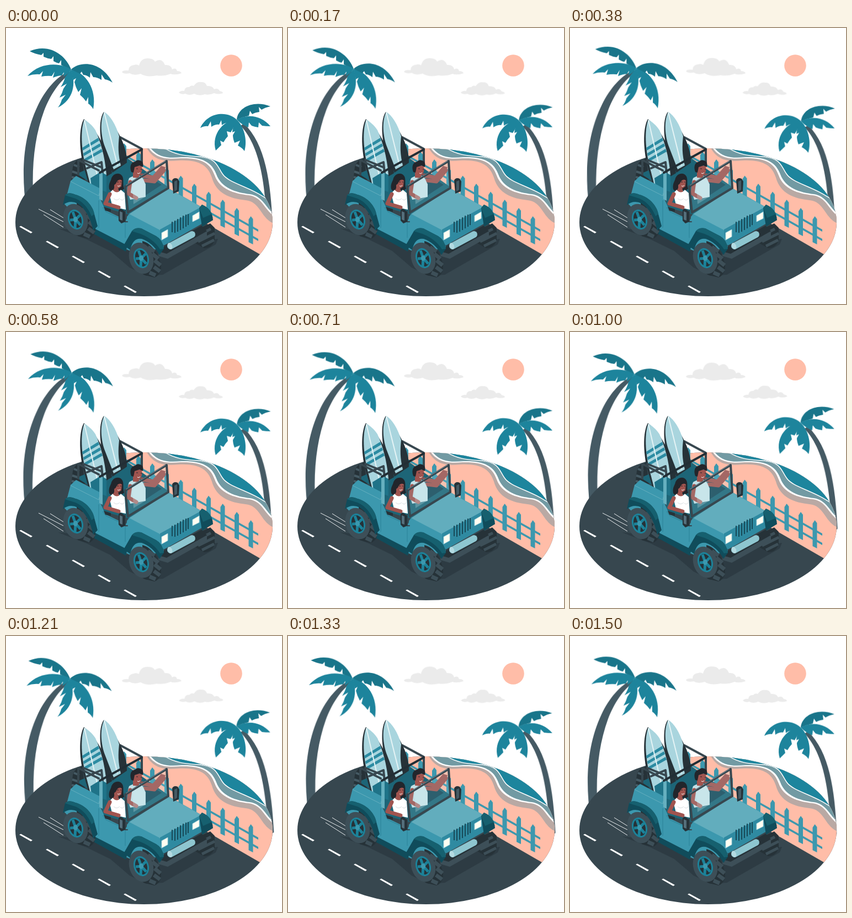
These frames come from a looping animation (500 by 500 pixels, 1.54 s). An HTML page without scripts:

```html
<!DOCTYPE html>
<html lang="en">
<head>
<meta charset="utf-8">
<title>Beach drive</title>
<style>
html, body { margin: 0; width: 100%; height: 100%; overflow: hidden; background: #fff; }
svg { display: block; width: 100vw; height: 100vh; }
.wind { animation: wind 1540ms linear infinite; }
.palms { transform-origin: 255px 199px; }
.clouds { transform-origin: 302px 88px; }
@keyframes wind {
  0%, 50%, 100% { transform: rotate(0deg); }
  25% { transform: rotate(1deg); }
  75% { transform: rotate(-1deg); }
}
.trunk { fill: #455a64; }
.leaf { fill: #1d849c; }
.shade { fill: #19758a; }
.body { fill: #3c98ae; }
.deep { fill: #104c5b; }
.arch { fill: #16606f; }
.dark { fill: #263238; }
.tyre { fill: #3d4f58; }
.skin { fill: #a0544f; }
.hair { fill: #22262c; }
.white { fill: #fff; }
.pale { fill: #a9d5de; }
.tube { fill: none; stroke: #37474f; stroke-width: 4; stroke-linejoin: round; stroke-linecap: round; }
.limb { fill: none; stroke: #a0544f; stroke-width: 7; stroke-linejoin: round; stroke-linecap: round; }
</style>
</head>
<body>
<svg viewBox="0 0 500 500">
<defs>
  <clipPath id="island"><ellipse cx="250" cy="352" rx="233" ry="134"/></clipPath>
  <path id="post" d="M0 6L4 0L8 5V51L0 47Z"/>
  <path id="dash" d="M0 0L3-1.500L24 10L21 12Z"/>
  <g id="wheel">
    <path class="dark" d="M2-31C18-28 34-6 36 16Q35 31 24 35L4 30Z"/>
    <path d="M12-20L24-12M20-8L31 1M24 4L35 13M23 16L34 24M15 26L26 31" stroke="#3d4f58" stroke-width="7"/>
    <ellipse class="tyre" rx="21.500" ry="29" transform="rotate(-18)"/>
    <ellipse class="dark" rx="12" ry="17" stroke="#1c8299" stroke-width="3" transform="rotate(-18)"/>
    <path d="M0 0L-5-14M0 0L8-8M0 0L9 10M0 0L-1 15M0 0L-10 1" stroke="#1c8299" stroke-width="5"/>
    <ellipse class="body" rx="4" ry="5"/>
  </g>
</defs>

<circle cx="408" cy="68" r="19.800" fill="#ffbda8"/>
<g class="wind clouds" fill="#ebebeb">
  <path d="M210 80Q212 76 222 77Q222 68 232 67Q237 65 241 68Q244 55 257 55Q267 55 270 61Q282 53 288 67Q299 66 301 75Q308 71 310 78Q317 78 318 82Q306 86 298 83Q286 88 273 86Q255 90 244 83Q232 87 224 82Q214 84 210 80Z"/>
  <path d="M313 117Q317 113 323 114Q324 106 332 107Q335 103 340 105Q346 96 354 98Q361 97 364 105Q374 104 377 111Q384 108 387 114Q393 115 393 118Q385 121 377 118Q368 122 360 120Q350 124 341 119Q332 123 325 119Q317 121 313 117Z"/>
</g>

<g class="wind palms">
  <path class="trunk" d="M37 330C27 262 31 197 57 142C71 112 92 88 113 79L119 81C96 96 80 122 69 150C50 202 45 260 51 330Z"/>
  <path class="shade" d="M118 75C108 49 78 27 43 42Q52 47 64 49L68 45L68 52Q74 55 82 56L86 51L86 60Q91 63 96 64L100 58L100 67Q107 71 118 75Z"/>
  <path class="leaf" d="M118 75C101 63 62 60 39 87Q50 83 61 84L67 78L64 88Q74 86 83 87L88 79L85 90Q95 86 101 86L105 80L104 88Q112 84 118 75Z"/>
  <path class="leaf" d="M118 75C127 100 123 130 94 144Q99 138 101 130L108 121L97 126Q102 118 104 110L110 101L99 107Q105 98 107 89Z"/>
  <path class="leaf" d="M118 75C145 81 165 111 158 147Q154 140 149 137L149 125L145 133Q140 126 134 121L137 109L131 116Q126 107 124 98L127 91L122 94Z"/>
  <path class="shade" d="M118 75C135 59 173 60 193 99Q186 94 179 93L173 84L173 94Q165 89 158 89L153 80L152 90Q146 85 140 85L137 79L134 83Z"/>

  <path class="trunk" d="M473 365C470 300 465 219 425 177L431 173C470 210 480 280 483 359Z"/>
  <path class="shade" d="M418 166C420 143 450 130 479 142Q469 144 463 148L458 143L459 152Q451 153 446 156L442 150L440 159Q429 161 418 166Z"/>
  <path class="leaf" d="M418 166C402 150 366 151 352 181Q360 177 366 178L371 169L372 179Q380 174 386 175L390 167L391 176Q398 171 403 172Z"/>
  <path class="leaf" d="M418 166C440 154 464 160 479 178Q470 178 464 177L458 171L457 180Q450 179 445 177L440 171L439 180Q428 176 418 166Z"/>
  <path class="leaf" d="M418 166C396 166 371 191 380 222Q385 217 390 212L388 204L394 207Q398 200 402 196L400 187L407 189Q413 180 418 166Z"/>
  <path class="leaf" d="M418 166C431 178 438 203 432 223Q428 217 420 213L424 204L414 208Q411 200 411 194L415 187L410 189Q411 176 418 166Z"/>
</g>

<g clip-path="url(#island)">
  <rect width="500" height="500" fill="#37474f"/>
  <path d="M205 215H500V433L205 263Z" fill="#ffbda8"/>
  <path d="M252 212C266 241 286 242 312 240C350 238 366 249 373 271C381 300 406 309 434 312C463 315 460 347 490 356V212Z" fill="#b9a9a4"/>
  <path d="M255 212C270 238 292 238 316 236C353 235 370 244 378 267C387 292 413 300 440 303C466 307 467 330 490 344V212Z" fill="#fff"/>
  <path d="M258 212C273 236 294 236 318 234C355 233 373 243 381 265C390 290 416 298 442 301C467 305 470 328 490 340V212Z" fill="#729aa3"/>
  <path d="M280 212C302 231 330 232 352 233C383 237 382 250 392 264C405 284 450 287 490 323V212Z" fill="#1d859d" stroke="#fff" stroke-width="1.500"/>
</g>

<g class="body">
  <use href="#post" x="210" y="209"/><use href="#post" x="236" y="224"/>
  <use href="#post" x="261" y="238"/><use href="#post" x="287" y="253"/>
  <use href="#post" x="312.500" y="267.500"/><use href="#post" x="337" y="282"/>
  <use href="#post" x="363" y="296.500"/><use href="#post" x="388.500" y="311"/>
  <use href="#post" x="414" y="326"/><use href="#post" x="439.500" y="341"/>
  <path d="M210 226L457 365V369L210 230ZM210 243L457 382V386L210 247Z"/>
</g>

<g class="white">
  <use href="#dash" x="24" y="360"/><use href="#dash" x="72" y="387"/>
  <use href="#dash" x="119" y="414"/><use href="#dash" x="166" y="441"/>
  <use href="#dash" x="213" y="468"/>
</g>
<path d="M59 328L104 351M68 338L104 361M80 329L104 344" stroke="#eceff1" stroke-width="1"/>

<!-- jeep -->
<path d="M94 363L158 369L218 403L299 391L384 382L380 392L284 447L254 449L224 434L189 404L146 383Z" fill="#2d3b43"/>
<path class="dark" d="M118 277L121 252Q125 238 138 237L143 275Z"/>
<path d="M123 248L133 252M120 260L132 264M119 270L130 273" stroke="#455a64" stroke-width="4"/>
<path class="dark" d="M340 368L370 354L378 362L378 384Q373 399 359 399L340 388Z"/>
<path d="M348 376L371 364M348 387L378 372M355 395L377 384" stroke="#3d4f58" stroke-width="5"/>

<path class="tube" d="M207 198L246 219V245"/>
<path d="M128 264L210 229L294 288L223 338L176 325L170 291Z" fill="#1d6577"/>

<!-- surfboards -->
<path class="dark" d="M177 152C169 164 168 191 176 224L193 262L219 244C219 215 206 188 177 152Z"/>
<path class="pale" d="M178 152C171 166 171 190 178 212L195 256L208 249C203 228 203 215 205 196C199 174 188 158 178 152Z"/>
<path d="M178 153L202 249" stroke="#e4f3f5" stroke-width="2"/>
<path class="dark" d="M141 165C134 177 131 207 139 245L151 287L192 263C188 231 168 186 141 165Z"/>
<path class="pale" d="M142 166C136 180 135 210 143 246L153 285L182 266C179 231 171 205 162 185C156 176 149 170 142 166Z"/>
<path d="M138 217L167 199L169 204L139 222ZM140 227L170 209L172 214L141 232ZM142 237L173 219L175 224L143 242Z" fill="#2c8ba2"/>
<path d="M142 167L167 275" stroke="#e4f3f5" stroke-width="2"/>

<path class="tube" d="M131 265V239L168 258M140 239L172 252M147 254L173 243L175 263"/>
<path d="M153 272L171 261L182 266V297L155 288Z" fill="#1f7388"/>
<path class="tube" d="M170 262L246 220" style="stroke:#222e35"/>

<!-- driver -->
<path d="M225 280L250 264L282 284L250 305Z" fill="#16495a"/>
<path class="limb" d="M252 276L269 278L286 258M247 267L267 271L282 254"/>
<path class="skin" d="M278 255L281 250L289 252L286 262L279 263Z"/>
<path d="M223 272Q234 265 246 269L253 283V306L225 311Q217 288 223 272Z" fill="#c3e0e6"/>
<path class="skin" d="M230 248L246 250Q248 263 241 268V272L230 271Z"/>
<path class="hair" d="M227 261C223 250 227 243 234 242Q238 237 245 241Q250 244 248 252L242 249L233 252L231 262Z"/>
<path d="M236 255H239M244 256H246" stroke="#22262c"/>
<path d="M238 263Q241 265 243 262" fill="none" stroke="#fff"/>
<path class="limb" d="M225 279L222 300L236 308"/>

<!-- body -->
<path class="body" d="M117 277L127 268L171 291L172 312L180 330L217 348L224 337L283 368L286 400L225 404L155 370L106 319Z"/>
<path d="M117 278L168 304L171 292" fill="none" stroke="#65afbf" stroke-width="1"/>
<path d="M169 265L175 262V313L169 310Z" fill="#65afbf"/>
<path d="M175 325L181 333L216 349V380M168 312V362" fill="none" stroke="#2b8298" stroke-width="1"/>
<path class="deep" d="M154 360L220 394L217 405L159 373Z"/>

<!-- passenger -->
<path class="hair" d="M187 292C185 282 190 278 191 272C195 262 207 261 211 269C214 275 211 284 214 291Q210 296 202 293Q192 299 187 292Z"/>
<path class="skin" d="M196 275Q204 270 210 276L209 287L203 291L206 298L191 299L196 290Z"/>
<path class="hair" d="M195 276Q195 267 203 267Q210 268 210 276Q203 272 199 282L194 286Z"/>
<path d="M201 279H204M207 279H209" stroke="#22262c"/>
<path d="M202 286Q205 288 207 285" fill="none" stroke="#fff"/>
<path class="white" d="M187 300L193 293Q201 302 208 293L215 299L217 329L193 324Z"/>
<path d="M195 309Q200 314 206 309M207 310Q211 314 214 309" fill="none" stroke="#d7dde0"/>
<path class="limb" d="M188 301L180 318L204 325"/>
<path class="dark" d="M177 324L190 328V333L180 331Z"/>

<!-- hood and front -->
<path d="M223 337L294 291L352 323L354 331L283 370Z" fill="#62adbd"/>
<path class="body" d="M219 342L223 337L277 365Q283 369 283 378L280 398L218 374Z"/>
<path d="M279 365L352 325L356 354L286 394Q278 383 279 365Z" fill="#2f8aa1"/>
<path d="M301 351V370M306 349V371M311 346V369M316 343V366M321 340V363M326 338V360M330 337V357" stroke="#174957" stroke-width="2"/>
<path d="M282 371L293 365V378L282 384ZM338 340L350 333V345L338 351Z" fill="#fffdf2" stroke="#a9d5de"/>
<path class="deep" d="M350 326L355 320Q374 328 375 348L355 360Z"/>
<path class="arch" d="M350 326L355 320Q368 325 373 337L357 344Z"/>
<path class="tyre" d="M277 405L291 408L364 368V378L293 418L276 413Z"/>
<path class="dark" d="M286 397L354 358L364 368L291 409L277 405Z"/>
<path d="M298 395L337 374" stroke="#8ec6d0" stroke-width="12" stroke-linecap="round"/>
<ellipse cx="297" cy="395" rx="4" ry="6" fill="#b5dbe2" transform="rotate(-25 297 395)"/>

<!-- wheels and arches -->
<use href="#wheel" x="126" y="347"/>
<path class="deep" d="M103 321L107 303Q113 296 126 302C145 307 158 324 160 337L166 359L158 367Q150 331 130 318Q115 311 103 321Z"/>
<path class="arch" d="M107 303Q113 296 126 302C145 307 158 324 160 337L155 341Q145 317 126 309Z"/>
<use href="#wheel" x="245" y="417"/>
<path class="deep" d="M213 394L228 368Q234 361 245 363L272 377Q284 384 286 400L278 411Q266 389 246 382Q230 379 225 402Z"/>
<path class="arch" d="M228 368Q234 361 245 363L272 377Q284 384 286 400L279 401Q268 383 244 373Z"/>

<!-- windscreen and mirrors -->
<path d="M217 290L291 243L294 291L223 336Z" fill="#b9e0e8" opacity=".14"/>
<path d="M229 283L250 270L252 306L231 319Z" fill="#d6eef2" opacity=".25"/>
<path class="tube" d="M216 287L291 241L294 290L221 334Z"/>
<path d="M217 285L289 241" stroke="#78909c" stroke-width="1"/>
<path class="tube" d="M216 331V351L220 351" style="stroke-width:2"/>
<path class="dark" d="M204 330Q207 326 211 329L216 333V351L209 354L204 349Z"/>
<path d="M206 332L211 334V349L206 347Z" fill="#546e7a"/>
<path class="dark" d="M301 276Q304 270 311 273L314 278L313 296L303 300Z"/>
<path d="M305 278L310 276V293L305 296Z" fill="#455a64"/>
</svg>
</body>
</html>
```
